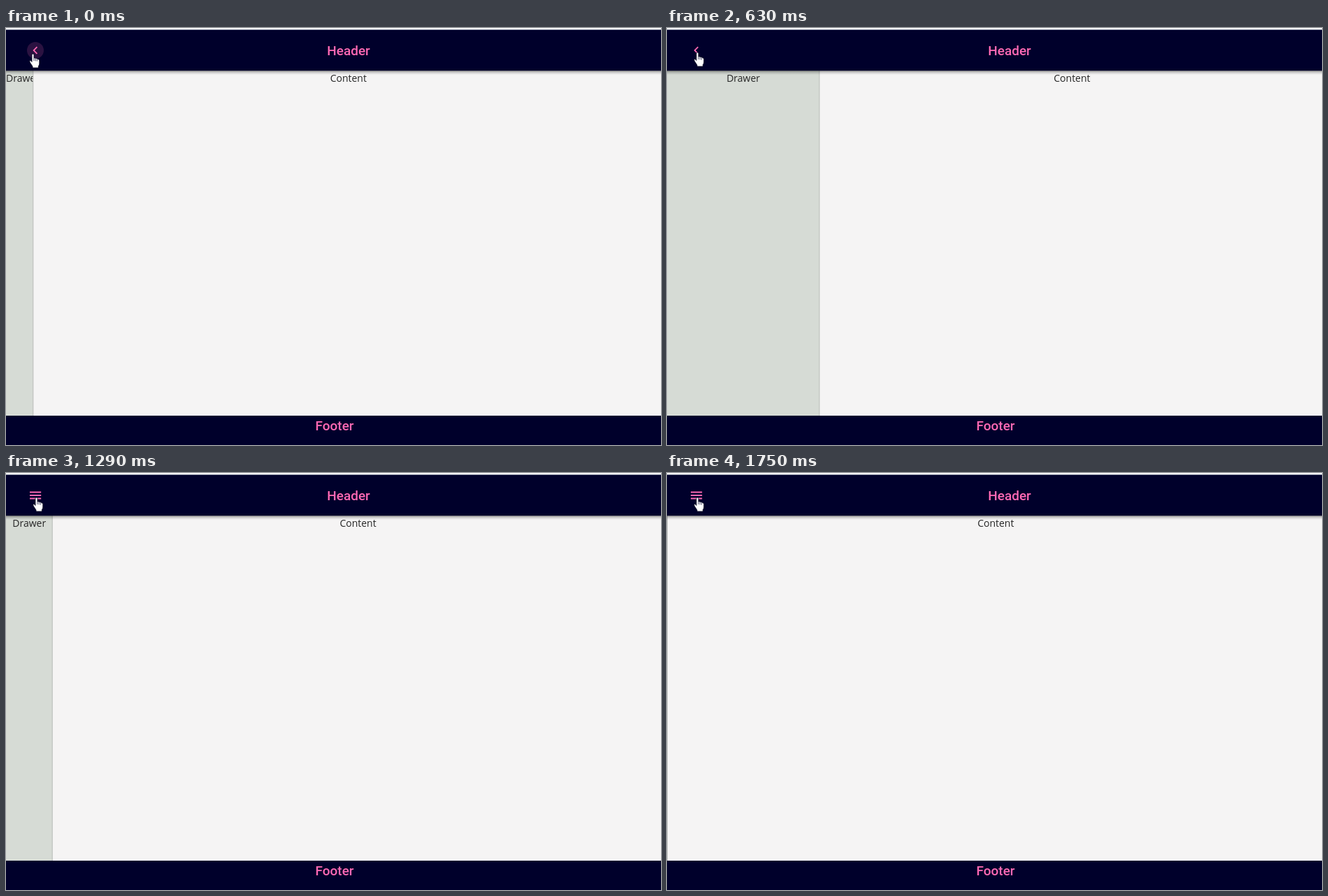
An HTML page that plays this animation: 937 px wide and 597 px high, repeating every 1870 ms.

```html
<!DOCTYPE html>
<html lang="en">
<head>
<meta charset="utf-8">
<title>Drawer layout</title>
<style>
  html, body { margin: 0; width: 100%; height: 100%; overflow: hidden; background: #f5f4f4; }
  svg { display: block; }
  text { text-anchor: middle; }
  .title { font: 500 19px Roboto, sans-serif; fill: #ff69b4; }
  .label { font: 14px "Open Sans", "Noto Sans", sans-serif; fill: #262626; }
  .bar { fill: #00002b; }
  .icon { fill: #ff69b4; }
</style>
</head>
<body>
<svg width="937" height="597" viewBox="0 0 937 597">
  <defs>
    <linearGradient id="shade" x2="0" y2="1">
      <stop offset="0" stop-color="#000" stop-opacity=".5"/>
      <stop offset=".4" stop-color="#000" stop-opacity=".17"/>
      <stop offset="1" stop-color="#000" stop-opacity="0"/>
    </linearGradient>
    <clipPath id="clip"><rect id="clipBox" y="61" height="494"/></clipPath>
  </defs>

  <rect width="937" height="597" fill="#f5f4f4"/>
  <g clip-path="url(#clip)">
    <rect y="61" width="230" height="494" fill="#d6dbd5"/>
    <text id="drawerText" class="label" y="77">Drawer</text>
    <g id="scrollbar">
      <rect y="539" width="50" height="16" fill="#f0f0f0"/>
      <path d="M9.5 543.5v7l-4-3.5z" fill="#a5a5a5"/>
      <rect id="thumb" x="15" y="541" height="12" fill="#bcbcbc"/>
      <path id="arrow" d="M-2 543.5v7l4-3.5z" fill="#444"/>
    </g>
  </g>
  <rect id="edge" y="61" width="1" height="494" fill="#b9bcb9"/>
  <text id="contentText" class="label" y="77">Content</text>

  <rect y="61" width="937" height="6" fill="url(#shade)"/>
  <rect width="937" height="3" fill="#f5fafb"/>
  <rect class="bar" y="2.5" width="937" height="58.5"/>
  <rect class="bar" y="555" width="937" height="42"/>
  <text class="title" x="490" y="38.5">Header</text>
  <text class="title" x="470" y="576">Footer</text>

  <circle id="ripple" cx="42" cy="32" fill="#ff69b4"/>
  <path id="back" class="icon" transform="translate(31.2 21.2) scale(.9)"
    d="M15.41 7.41L14 6l-6 6 6 6 1.41-1.41L10.83 12z"/>
  <path id="menu" class="icon" d="M34 26.6h16.2v1.8H34zM34 31.1h16.2v1.8H34zM34 35.6h16.2v1.8H34z"/>
  <g id="hand">
    <path fill="#fff" stroke="#00001c" stroke-width=".8" d="M0 1.5Q0 0 1.5 0T3 1.5V6q1.3-.8 2.2.5 1.4-.6 2 .6
      1.6-.5 2.2 1 1.4 0 1.4 1.6V14q0 2-1.4 3.5V20H1V18L-2.6 12.5Q-3.8 10.2-2.6 9.6-1.4 9 0 11.5z"/>
    <path fill="none" stroke="#00002b" stroke-width=".7" d="M3 6v4M5.3 6.6v3.8M7.6 7.4v3.2"/>
  </g>
</svg>
<script>
  const LOOP = 1870, FPS = 24, TEXT_WIDTH = 48;
  const $ = id => document.getElementById(id);

  // [ms, value]
  const WIDTH = [[0, 39], [167, 118], [375, 195], [540, 214], [700, 220], [800, 220.5], [1000, 220.5],
    [1083, 184], [1167, 125.3], [1375, 39.5], [1550, 11], [1667, 3], [1750, 0]];
  const RADIUS = [[0, 12], [167, 17], [300, 18], [1000, 0], [1083, 11], [1167, 16.5], [1300, 18]];
  const ALPHA = [[0, .17], [167, .09], [300, 0], [1000, 0], [1042, .17], [1083, .17], [1167, .11], [1300, 0]];
  const HAND_X = [[0, 37], [167, 37], [292, 42]];
  const HAND_Y = [[0, 37], [125, 35]];

  // Monotone cubic through the table
  function at(table, t) {
    const last = table.length - 1;
    if (t >= table[last][0]) return table[last][1];
    let i = 0;
    while (table[i + 1][0] <= t) i++;
    const slope = k => k < 0 || k >= last ? 0 :
      (table[k + 1][1] - table[k][1]) / (table[k + 1][0] - table[k][0]);
    const tangent = k => {
      if (k === 0) return slope(0);
      const a = slope(k - 1), b = slope(k);
      return a * b > 0 ? 2 * a * b / (a + b) : 0;
    };
    const [t0, a] = table[i], [t1, b] = table[i + 1];
    const h = t1 - t0, u = (t - t0) / h, v = 1 - u;
    return a * v * v * (1 + 2 * u) + b * u * u * (3 - 2 * u)
      + h * u * v * (tangent(i) * v - tangent(i + 1) * u);
  }

  const set = (id, name, value) => $(id).setAttribute(name, value);
  const show = (id, on) => set(id, "visibility", on ? "visible" : "hidden");

  function draw(t) {
    const w = Math.max(0, at(WIDTH, t));
    set("clipBox", "width", w);
    set("edge", "x", Math.max(0, w - .7));
    set("drawerText", "x", Math.max(w, TEXT_WIDTH) / 2);
    set("contentText", "x", 470.3 + w / 2);

    show("scrollbar", t > 1000 && w > 1 && w < TEXT_WIDTH - 1);
    set("thumb", "width", Math.max(0, w - 31));
    set("arrow", "transform", `translate(${w - 8.5} 0)`);

    set("ripple", "r", Math.max(0, at(RADIUS, t)));
    set("ripple", "fill-opacity", at(ALPHA, t));
    show("back", t < 700);
    show("menu", t >= 700);
    set("hand", "transform", `translate(${at(HAND_X, t)} ${at(HAND_Y, t)})`);
  }

  const start = performance.now();
  function tick() {
    const t = (performance.now() - start) % LOOP;
    draw(Math.floor((t + 4) * FPS / 1000) * 1000 / FPS);
    requestAnimationFrame(tick);
  }
  tick();
</script>
</body>
</html>
```
